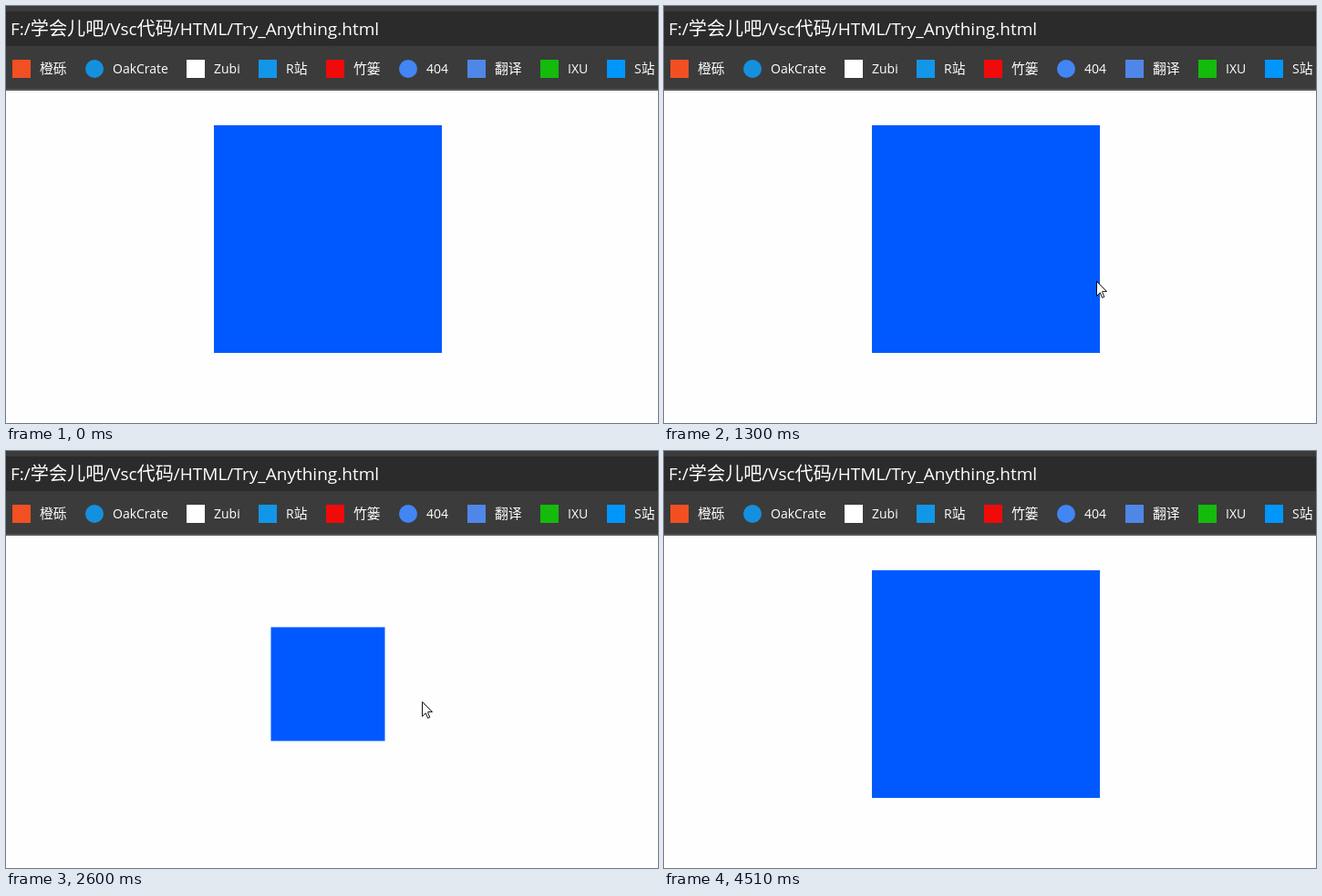
Animation, 715 px wide and 458 px high, one loop 4920 ms. Source, as an HTML page:

```html
<!DOCTYPE html>
<html lang="zh-CN">
<head>
<meta charset="utf-8">
<title>Hover square</title>
<style>
  html, body { margin: 0; width: 100%; height: 100%; overflow: hidden; background: #fefefe; }
  svg { display: block; }
  text { fill: #fff; font-family: 'Open Sans', 'Noto Sans CJK SC', 'Noto Sans CJK JP', sans-serif; white-space: pre; }
  .path { font-size: 19px; }
  .mark { font-size: 14px; }
  .han { font-size: 1.06em; font-family: 'Noto Sans CJK SC', 'Noto Sans CJK JP', sans-serif; }
</style>
</head>
<body>
<svg width="715" height="458" viewBox="0 0 715 458">
  <rect width="715" height="458" fill="#fefefe"/>
  <rect width="715" height="92" fill="#3b3b3b"/>
  <rect y="6" width="715" height="38" fill="#2b2b2b"/>
  <rect y="91" width="715" height="2" fill="#565656"/>
  <g id="bar"></g>
  <rect id="box" fill="#0059ff"/>
  <path id="cursor" d="M.5 .5V16.5L4.3 12.9L6.6 18.4L8.8 17.5L6.6 12.2V11.6H11.5Z" fill="#fff" stroke="#111"/>
</svg>
<script>
const LOOP = 4920;
const CENTER = [353, 256];
const FULL = 125, SMALL = FULL / 2;
const AWAY = [725, 470];
const $ = id => document.getElementById(id);

function set(el, attrs) {
  for (const k in attrs) el.setAttribute(k, attrs[k]);
  return el;
}

function add(parent, tag, attrs, content = '') {
  const el = set(document.createElementNS('http://www.w3.org/2000/svg', tag), attrs);
  el.textContent = content;
  return parent.appendChild(el);
}

// Chinese runs are set slightly larger than Latin ones.
function label(x, y, cls, str) {
  const text = add($('bar'), 'text', { x, y, class: cls });
  for (const run of str.match(/[\u4e00-\u9fff]+|[^\u4e00-\u9fff]+/g))
    add(text, 'tspan', /[\u4e00-\u9fff]/.test(run) ? { class: 'han' } : {}, run);
  return text.getComputedTextLength();
}

label(5, 32, 'path', 'F:/学会儿吧/Vsc代码/HTML/Try_Anything.html');

// Bookmarks flow from left to right: icon, name, gap.
let left = 37;
for (const [name, fill, rx] of [
  ['橙砾', '#f25022', 0], ['OakCrate', '#1490df', 10], ['Zubi', '#ffffff', 0],
  ['R站', '#1296e8', 0], ['竹篓', '#f00a0a', 0], ['404', '#4285f4', 10],
  ['翻译', '#4f87e8', 0], ['IXU', '#14bb0c', 0], ['S站', '#0096fa', 0]
]) {
  const x = Math.round(left);
  add($('bar'), 'rect', { x: x - 30, y: 59, width: 20, height: 20, rx, fill });
  left += label(x, 74, 'mark', name) + 50.4;
}

const easeIn = f => f * f;
const easeOut = f => 1 - (1 - f) ** 3;
const smooth = f => f * f * (3 - 2 * f);
const mix = (a, b, f) => a.map((v, i) => v + (b[i] - v) * f);

const glide = (from, to, ease = smooth) => f => mix(from, to, ease(f));
// Swings out by an offset and comes back.
const swing = (from, to, offset, power) => f =>
  mix(from, to, f).map((v, i) => v + offset[i] * Math.sin(Math.PI * f) ** power);

// Mouse strokes: start, end, number of updates, path.
const strokes = [
  [310, 620, 8, glide([720, 516], [377, 270], easeOut)],
  [1000, 1080, 3, glide([377, 270], [367, 262])],
  [1250, 1770, 11, swing([367, 262], [388, 248], [288, 119], 1.67)],
  [1810, 1890, 3, glide([388, 248], [364, 231])],
  [2190, 2700, 11, swing([364, 231], [356, 235], [182, 75], 1)],
  [2750, 2750, 1, glide([356, 235], [354, 235])],
  [3030, 3160, 4, glide([354, 235], [562, 296])],
  [3770, 4000, 5, glide([562, 296], [380, 252])],
  [4230, 4510, 7, glide([380, 252], AWAY, easeIn)]
];

const reach = at => Math.max(...at.map((v, i) => Math.abs(v - CENTER[i])));

// Inward moves shrink the box at its full edge; outward moves restore it at the small edge.
const poses = [{ t: 0, at: AWAY, half: FULL }];
for (const [start, end, count, path] of strokes) {
  for (let i = 0; i < count; i++) {
    const at = path((i + 1) / count).map(Math.round);
    const edge = reach(at) < reach(poses.at(-1).at) ? FULL : SMALL;
    const t = start + (end - start) * i / Math.max(1, count - 1);
    poses.push({ t: Math.floor(t / 10) * 10, at, half: reach(at) < edge ? SMALL : FULL });
  }
}

function draw(t) {
  const { at, half } = poses.findLast(p => p.t <= t);
  set($('box'), { x: CENTER[0] - half, y: CENTER[1] - half, width: half * 2, height: half * 2 });
  set($('cursor'), { transform: `translate(${at})` });
}

const begin = performance.now();
function tick() {
  draw((performance.now() - begin) % LOOP);
  requestAnimationFrame(tick);
}
tick();
</script>
</body>
</html>
```
